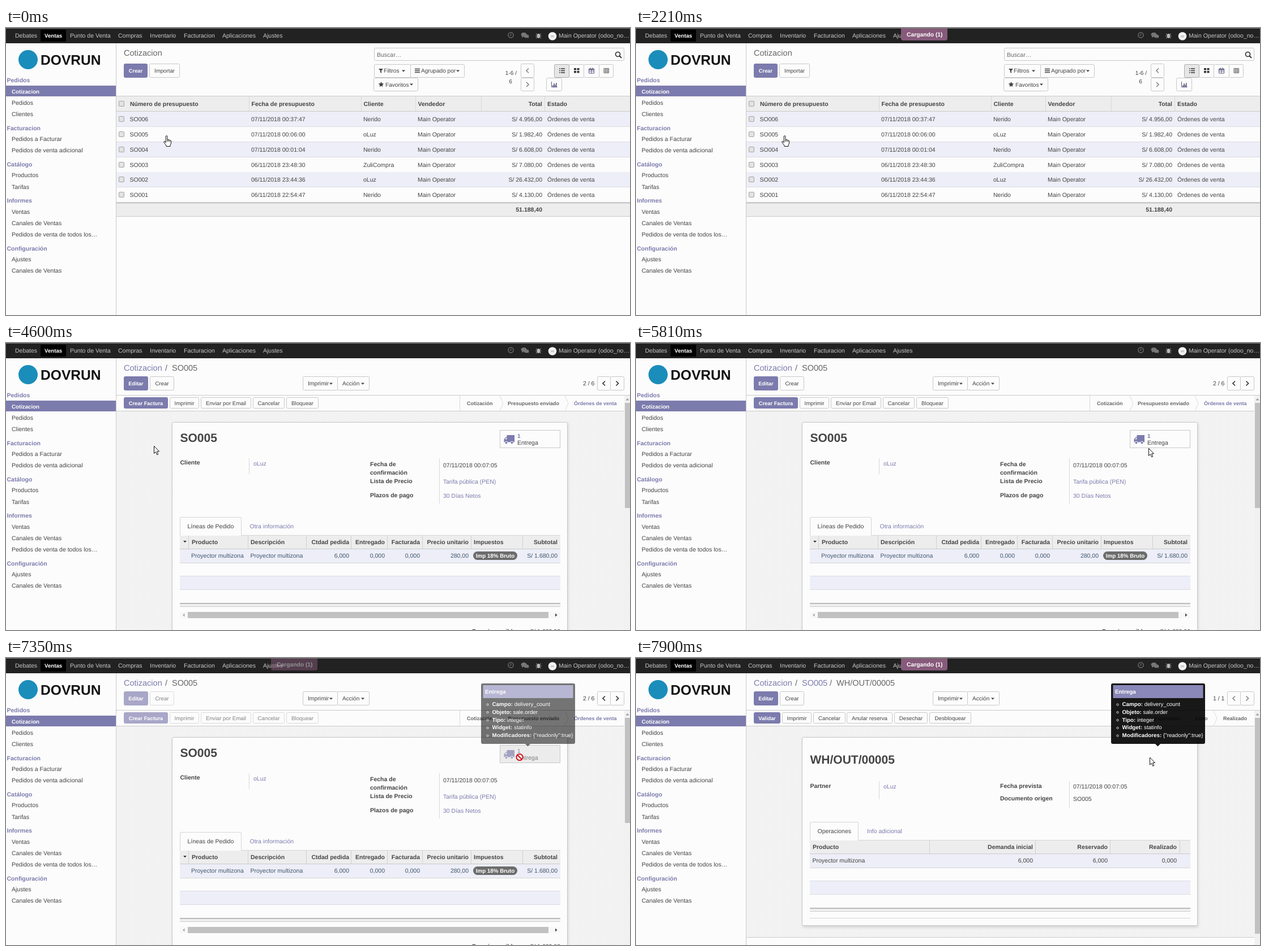
An HTML page for the animation above (8000 ms loop, 1102 by 508 pixels).

```html
<!DOCTYPE html>
<html lang="es">
<head>
<meta charset="utf-8">
<title>Cotizacion</title>
<style>
  html, body { margin: 0; width: 100%; height: 100%; overflow: hidden; background: #fcfcfc; }
  svg { display: block; width: 1102px; height: 508px; }
  text { font-family: "Liberation Sans", Arial, sans-serif; text-rendering: geometricPrecision; white-space: pre; }
</style>
</head>
<body>
<svg id="stage" viewBox="0 0 1102 508"></svg>
<script>
const PURPLE = '#7c7bad', INK = '#444', PAPER = '#fcfcfc', LINE = '#cacaca', STRIPE = '#edeef7', HEAD = '#ededed';
const CLIENTS = ['Nerido', 'oLuz', 'ZuliCompra'];
const USER = 'Main Operator', PRODUCT = 'Proyector multizona', TAX = 'Imp 18% Bruto';

// SVG helpers
const text = (x, y, label, { size = 10.5, bold, fill = INK, anchor = 'start' } = {}) =>
  `<text x="${x}" y="${y}" font-size="${size}" fill="${fill}" text-anchor="${anchor}"${bold ? ' font-weight="bold"' : ''}>${label}</text>`;
const bold = (x, y, label, options) => text(x, y, label, { bold: true, ...options });
const right = (x, y, label, options) => text(x, y, label, { anchor: 'end', ...options });
const link = (x, y, label, options) => text(x, y, label, { fill: PURPLE, ...options });
const rect = (x, y, w, h, fill, extra = '') => `<rect x="${x}" y="${y}" width="${w}" height="${h}" fill="${fill}" ${extra}/>`;
const box = (x, y, w, h, fill = PAPER, rx = 2, stroke = '#c8c8c8') =>
  rect(x + .5, y + .5, w - 1, h - 1, fill, `rx="${rx}" stroke="${stroke}"`);
const hline = (x1, x2, y, color = LINE, h = 1) => rect(x1, y, x2 - x1, h, color);
const vline = (x, y1, y2, color = '#d9d9d9') => rect(x, y1, 1, y2 - y1, color);
const path = (d, fill = 'none', stroke = 'none', width = 1) =>
  `<path d="${d}" fill="${fill}" stroke="${stroke}" stroke-width="${width}"/>`;
const circle = (x, y, r, fill, stroke = 'none', width = 1) =>
  `<circle cx="${x}" cy="${y}" r="${r}" fill="${fill}" stroke="${stroke}" stroke-width="${width}"/>`;
const group = (id, content) => `<g id="${id}">${content}</g>`;
const caret = (x, y, fill = INK) => path(`M${x - 3} ${y - 1.5}h6l-3 3.2z`, fill);
const chevron = (x, y, dir, color = INK) => path(`M${x - 2 * dir} ${y - 4}l${4 * dir} 4l${-4 * dir} 4`, 'none', color, 1.7);

function button(x, y, w, h, label = '', primary = false) {
  const style = primary ? { size: 9.3, bold: true, fill: '#fff' } : { size: 9.7 };
  return box(x, y, w, h, primary ? PURPLE : PAPER, 2, primary ? PURPLE : '#c8c8c8') +
    text(x + w / 2, y + h / 2 + 3.5, label, { ...style, anchor: 'middle' });
}
// Buttons given as [x, width, label]; the first one is highlighted.
const buttonRow = (y, h, items) => items.map(([x, w, label], i) => button(x, y, w, h, label, i === 0)).join('');

function navbar() {
  const items = [[16, 'Debates'], [113, 'Punto de Venta'], [198, 'Compras'], [254, 'Inventario'],
    [314, 'Facturacion'], [382, 'Aplicaciones'], [454, 'Ajustes']];
  const gray = '#777';
  return rect(0, 0, 1102, 27, '#222') + hline(0, 1102, 0, '#777') + rect(61, 3, 45, 21, '#000') +
    bold(68, 17, 'Ventas', { size: 9.7, fill: '#fff' }) +
    items.map(([x, label]) => text(x, 17, label, { fill: '#c8c8c8' })).join('') +
    circle(891.5, 12.5, 4.6, 'none', gray, 1.3) + path('M891.8 9.5v3.5h-2.5', 'none', gray) +
    `<ellipse cx="914.5" cy="11.5" rx="5" ry="3.5" fill="${gray}"/><ellipse cx="919" cy="14.5" rx="4.5" ry="3" fill="${gray}"/>` +
    path('M911 13v4l4-2zM920 16l3 2v-4z', gray) +
    `<ellipse cx="940.5" cy="14" rx="2.6" ry="4" fill="#bbb"/>` +
    path('M936 10l3 2M945 10l-3 2M935.5 14h10M936 18l3-2M945 18l-3-2', 'none', '#bbb') +
    circle(965, 14.5, 7.3, '#f4f4f4') + rect(962, 13, 6, 3.5, '#ccc', 'rx="1"') +
    text(976, 17, USER + ' (odoo_no…', { fill: '#c8c8c8' });
}

function sidebar() {
  const headings = [[92, 'Pedidos'], [176.5, 'Facturacion'], [241, 'Catálogo'], [305, 'Informes'], [389.5, 'Configuración']];
  const items = [[132, 'Pedidos'], [152.5, 'Clientes'], [196.5, 'Pedidos a Facturar'], [216.5, 'Pedidos de venta adicional'],
    [260.5, 'Productos'], [281, 'Tarifas'], [325, 'Ventas'], [345, 'Canales de Ventas'],
    [365.5, 'Pedidos de venta de todos los…'], [409.5, 'Ajustes'], [429.5, 'Canales de Ventas']];
  return rect(0, 27, 194, 481, PAPER) + vline(194, 27, 508, LINE) +
    circle(39, 56, 17, '#1b8dbb') + bold(61, 65, 'DOVRUN', { size: 24.6, fill: '#111' }) +
    rect(0, 102, 194, 19, PURPLE) + bold(10, 115.5, 'Cotizacion', { size: 9.7, fill: '#fff' }) +
    headings.map(([y, label]) => bold(1.5, y + 4, label, { fill: PURPLE })).join('') +
    items.map(([y, label]) => text(10, y + 3.7, label)).join('');
}

const checkbox = y => box(199, y - 5, 10, 10, '#e2e2e2', 1.5, '#a5a5a5');
const crumb = (x, label, isLink = true) => text(x, 49.2, label, { size: 14.5, fill: isLink ? PURPLE : '#666' });

function listPage() {
  const orders = [['07/11/2018 00:37:47', 0, '4.956,00'], ['07/11/2018 00:06:00', 1, '1.982,40'],
    ['07/11/2018 00:01:04', 0, '6.608,00'], ['06/11/2018 23:48:30', 2, '7.080,00'],
    ['06/11/2018 23:44:36', 1, '26.432,00'], ['06/11/2018 22:54:47', 0, '4.130,00']];
  const columns = [[219, 'Número de presupuesto'], [433.5, 'Fecha de presupuesto'], [631.5, 'Cliente'], [727.5, 'Vendedor'], [956, 'Estado']];
  const rows = orders.map(([date, client, total], i) => {
    const top = 148 + Math.round(i * 26.85), y = top + 17;
    return rect(195, top, 907, 27, i % 2 ? PAPER : STRIPE) + hline(195, 1102, top + 26, '#dcdce2') + checkbox(top + 13) +
      text(218.5, y, 'SO00' + (6 - i)) + text(433, y, date) + text(631, y, CLIENTS[client]) + text(727, y, USER) +
      right(947, y, 'S/ ' + total) + text(956, y, 'Órdenes de venta');
  }).join('');
  const small = { size: 10.1 };
  return crumb(208, 'Cotizacion', false) +
    button(208, 63, 42, 25, 'Crear', true) + button(253, 63, 54, 25, 'Importar') +
    box(650, 35, 442, 23) + text(655, 50.5, 'Buscar…', { fill: '#666' }) +
    circle(1080.5, 46.5, 4, 'none', '#333', 1.7) + path('M1083.5 49.5l3.5 3.5', 'none', '#333', 2) +
    box(650, 64, 65, 24) + path('M658 72h8l-3 3.5v4.5l-2-1.5v-3z', INK) + text(667, 79, 'Filtros', small) + caret(702, 76) +
    box(714, 64, 96, 24) + path('M722 72.5h9M722 75.5h9M722 78.5h9', 'none', INK, 1.5) + text(733, 79, 'Agrupado por', small) + caret(798, 76) +
    box(649, 88, 79, 24) + path('M662.5 95l1.4 3 3.3.4-2.4 2.3.6 3.3-2.9-1.6-2.9 1.6.6-3.3-2.4-2.3 3.3-.4z', INK) +
    text(670, 103.5, 'Favoritos', small) + caret(716, 100) +
    right(902, 83, '1-6 /', small) + text(891, 98, '6', { ...small, anchor: 'middle' }) +
    box(909, 63, 24, 25) + chevron(921, 75.5, -1, '#888') + box(909, 88, 24, 24) + chevron(921, 100, 1, '#888') +
    box(994, 64, 27, 24) + path('M1003 71h4v3.5h-4zM1008.5 71h4v3.5h-4zM1003 76h4v3.5h-4zM1008.5 76h4v3.5h-4z', '#333') +
    box(968, 64, 27, 24, '#e6e6e6', 2, '#adadad') +
    path('M980 72h7M980 75.5h7M980 79h7M977 72h1.7M977 75.5h1.7M977 79h1.7', 'none', '#333', 1.6) +
    box(1020, 64, 28, 24) + path('M1029.5 72.5h9v7.5h-9zM1032 70v3M1036 70v3M1030 76h9M1034 73v7', 'none', '#55557f') + rect(1029, 72, 10, 2, '#55557f') +
    box(1047, 64, 26, 24) + path('M1056 71.5h8.5v8h-8.5zM1056 74h8M1056 77h8M1059 72v8M1062 72v8', 'none', '#666') +
    box(954, 88, 28, 24) + path('M963.5 95v9.5h10', 'none', '#55557f') + path('M966 104v-3M968 104v-6M970 104v-4M972 104v-7', 'none', '#55557f', 1.4) +
    hline(195, 1102, 120) + rect(195, 121, 907, 26, HEAD) + checkbox(134) +
    [429, 627, 723, 839, 951].map(x => vline(x, 121, 147)).join('') +
    columns.map(([x, label]) => bold(x, 137.5, label)).join('') + right(947, 137.5, 'Total', { bold: true }) +
    rows + hline(195, 1102, 147) + rect(195, 309, 907, 25, HEAD) + hline(195, 1102, 308.5, '#c4c4c4', 2) + hline(195, 1102, 333) +
    right(947, 325, '51.188,40', { bold: true });
}

// Parts shared by both form pages
const chrome = (pager, arrowColor, thumbHeight) =>
  rect(195, 121, 897, 387, 'url(#weave)') + hline(195, 1102, 92) + hline(195, 1092, 120) +
  box(524, 59, 62, 25) + text(533, 75, 'Imprimir', { size: 10.3 }) + caret(574, 72) +
  box(585, 59, 57, 25) + text(594, 75, 'Acción', { size: 10.1 }) + caret(630, 72) +
  text(1019, 75, pager) + box(1044, 59, 24, 25) + box(1067, 59, 25, 25) + chevron(1056, 71.5, -1, arrowColor) + chevron(1079.5, 71.5, 1, arrowColor) +
  rect(1092, 93, 10, 415, '#f1f1f1') + path('M1094.5 101.5l3-3.5 3 3.5z', '#999') + rect(1093, 106, 9, thumbHeight, '#c1c1c1');
const stage = (x, label, fill = '#666') => bold(x, 109.7, label, { size: 9, fill });
const stageArrow = x => path(`M${x} 93.5l6 13.5-6 13.5`, 'none', '#ddd');
const sheet = height => rect(294, 142, 699, height + 1, '#000', 'rx="2" opacity=".12" filter="url(#soft)"') + box(293, 140, 699, height, PAPER, 2);
const tab = (y, w) => hline(307, 979, y + 32, '#d5d5d5') + path(`M307.5 ${y + 33}v-31q0-1.5 1.5-1.5h${w - 4}q1.5 0 1.5 1.5v31`, PAPER, '#d5d5d5');
const gridHead = (y, separators) => rect(307, y, 672, 24, HEAD) + hline(307, 979, y + 23) + separators.map(x => vline(x, y, y + 23, '#d0d0d0')).join('');
const gridBody = y => rect(307, y, 672, 24, STRIPE) + hline(307, 979, y + 24, '#d5d5d5') + rect(307, y + 47, 672, 24, STRIPE) +
  hline(307, 979, y + 47, '#dcdce4') + hline(307, 979, y + 71, '#dcdce4') + rect(307, y + 95, 672, 6, '#f0f0f0') +
  hline(307, 979, y + 95, '#bbb', 2) + hline(307, 979, y + 101);

function orderPage() {
  const numbers = { fill: '#3f566e' };
  const truck = path('M884.5 163h13.5v12.5h-13.5zM879.5 175.5v-5l3-4h3v9z', PURPLE) + path('M881 170.5l2-2.7h1.5v2.7z', '#e8e8f0') +
    circle(883.5, 176.5, 2.4, PURPLE, PAPER) + circle(893.5, 176.5, 2.4, PURPLE, PAPER);
  const heads = [[606, 'Ctdad pedida'], [669, 'Entregado'], [731, 'Facturada'], [817, 'Precio unitario'], [974, 'Subtotal']];
  const values = ['6,000', '0,000', '0,000', '280,00', 'S/ 1.680,00'];
  return chrome('2 / 6', '#333', 186) + crumb(208, 'Cotizacion') + crumb(281, '/', false) + crumb(293, 'SO005', false) +
    group('actions', buttonRow(59, 25, [[208, 43, 'Editar'], [254, 43, 'Crear']]) +
      buttonRow(96, 20, [[208, 78, 'Crear Factura'], [289, 52, 'Imprimir'], [344, 89, 'Enviar por Email'], [436, 56, 'Cancelar'], [495, 57, 'Bloquear']])) +
    vline(801, 93, 120) + stage(814, 'Cotización') + stageArrow(872) + stage(886, 'Presupuesto enviado') + stageArrow(987) + stage(1003, 'Órdenes de venta', PURPLE) +
    sheet(400) + bold(307.5, 175, 'SO005', { size: 21 }) +
    `<rect id="statBox" x="872.5" y="154.5" width="106" height="31" stroke="#c8c8c8"/>` +
    group('stat', truck + bold(903, 167.5, '1', { size: 10, fill: PURPLE }) + text(903, 180, 'Entrega')) +
    bold(307.5, 215, 'Cliente') + vline(429, 204, 232) + link(437, 216.5, CLIENTS[1]) +
    [[218, 'Fecha de'], [233, 'confirmación'], [247.5, 'Lista de Precio'], [272.5, 'Plazos de pago']].map(([y, label]) => bold(643, y, label)).join('') +
    vline(765, 204, 284) + text(772, 219.5, '07/11/2018 00:07:05') + link(772, 249, 'Tarifa pública (PEN)') + link(772, 274, '30 Días Netos') +
    tab(308, 109) + text(320.5, 327.7, 'Líneas de Pedido') + link(430.5, 327.7, 'Otra información') +
    gridHead(341, [322, 427, 530, 609, 673, 735, 821, 912]) + caret(316, 351.5, '#333') +
    [[328, 'Producto'], [432, 'Descripción'], [826, 'Impuestos']].map(([x, label]) => bold(x, 355.5, label)).join('') +
    gridBody(365) + heads.map(([x, label], i) => right(x, 355.5, label, { bold: true }) + right(x, 380, values[i], numbers)).join('') +
    text(327, 380, PRODUCT, numbers) + text(431.5, 380, PRODUCT, numbers) +
    rect(825, 369, 78, 15, '#6c6c6c', 'rx="7.5"') + bold(864, 380, TAX, { size: 9.8, fill: '#fff', anchor: 'middle' }) +
    rect(307, 476, 672, 11, '#f8f8f8') + rect(321, 476, 637, 11, '#c1c1c1') +
    path('M315.5 478.5v6l-3.5-3z', '#aaa') + path('M970 478.5v6l3.5-3z', '#444') +
    right(904, 513.5, 'Base imponible:', { bold: true }) + right(979, 513.5, 'S/ 1.680,00');
}

function deliveryPage() {
  const columns = [[701, 'Demanda inicial', '6,000'], [833, 'Reservado', '6,000'], [955, 'Realizado', '0,000']];
  return chrome('1 / 1', '#888', 382) + crumb(208, 'Cotizacion') + crumb(281, '/', false) + crumb(293, 'SO005') + crumb(342, '/', false) + crumb(354, 'WH/OUT/00005', false) +
    buttonRow(59, 25, [[208, 43, 'Editar'], [254, 43, 'Crear']]) +
    buttonRow(96, 20, [[208, 47, 'Validar'], [258, 52, 'Imprimir'], [313, 57, 'Cancelar'], [372, 81, 'Anular reserva'], [456, 59, 'Desechar'], [518, 74, 'Desbloquear']]) +
    stage(915, 'Esperando', PURPLE) + stageArrow(972) + stage(988, 'Listo') + stageArrow(1020) + stage(1037, 'Realizado') +
    sheet(334) + bold(307.5, 187, 'WH/OUT/00005', { size: 21 }) +
    bold(307.5, 229.5, 'Partner') + vline(429, 218, 250) + link(437, 231, CLIENTS[1]) +
    bold(643, 229.5, 'Fecha prevista') + bold(643, 251.5, 'Documento origen') + vline(765, 218, 266) +
    text(772, 231, '07/11/2018 00:07:05') + text(772, 253, 'SO005') +
    tab(290, 86) + text(320.5, 310, 'Operaciones') + link(408, 310, 'Info adicional') +
    gridHead(323, [518, 705, 837, 960]) + bold(312, 337.5, 'Producto') + gridBody(347) +
    columns.map(([x, label, value]) => right(x, 337.5, label, { bold: true }) + right(x, 362, value)).join('') +
    text(311.5, 362, PRODUCT) + hline(307, 979, 460, '#d5d5d5') +
    rect(195, 494, 897, 14, PAPER) + hline(195, 1092, 494);
}

function tooltip() {
  const facts = [['Campo', 'delivery_count'], ['Objeto', 'sale.order'], ['Tipo', 'integer'], ['Widget', 'statinfo'], ['Modificadores', '{"readonly":true}']];
  return `<g opacity=".9">${rect(839, 45, 166, 107, '#000', 'rx="3"')}${path('M917 152h9l-4.5 4.5z', '#000')}</g>` +
    rect(842.5, 48, 159, 23, '#8a88b8') + bold(846, 63, 'Entrega', { size: 9.9, fill: '#fff' }) +
    facts.map(([key, value], i) => circle(850.5, 82.5 + i * 13.75, 1.7, 'none', '#fff', .8) +
      text(858.5, 85 + i * 13.75, `<tspan font-weight="bold">${key}:</tspan> ${value}`, { size: 9.8, fill: '#fff' })).join('');
}

const pointers = {
  arrow: path('M.5.5V13.5L3.5 10.7 5.7 15.8 7.8 14.9 5.7 9.9H9.5Z', '#fff', '#111'),
  hand: path('M-.8 13V2a1.3 1.3 0 0 1 2.7 0V7.5Q3.5 6.5 4 8 5.8 7.2 6.3 9 8 8.3 8.5 10V14Q8 16 7 17V19.5H0V18L-4 12.5Q-4.7 10.5-3 10.5L-.8 12.5Z', '#fff', '#111') +
    path('M1.9 8v3M4 8.5v2.5M6.3 9.5v2', 'none', '#111'),
  ban: circle(0, 0, 5.6, '#fff', '#d0121b', 2) + path('M-4-4l8 8', 'none', '#d0121b', 2),
};

document.getElementById('stage').innerHTML =
  `<defs><pattern id="weave" width="4" height="4" patternUnits="userSpaceOnUse">${rect(0, 0, 4, 4, '#f8f8f8')}
    ${[[0, 0], [1, 1], [2, 2], [3, 3], [2, 0], [0, 2]].map(([x, y]) => rect(x, y, 1, 1, '#e9e9e9')).join('')}</pattern>
    <filter id="soft" x="-5%" y="-5%" width="110%" height="110%"><feGaussianBlur stdDeviation="2.5"/></filter></defs>` +
  rect(0, 0, 1102, 508, PAPER) + group('list', listPage()) + group('order', orderPage()) + group('delivery', deliveryPage()) +
  sidebar() + navbar() +
  group('loader', path('M468 1h82v17q0 4-4 4h-74q-4 0-4-4z', '#875a7b') +
    bold(478, 14.5, 'Cargando (<tspan id="pending">1</tspan>)', { size: 10.3, fill: '#fff' })) +
  group('tooltip', tooltip()) +
  Object.entries(pointers).map(([name, shape]) => group(name, shape)).join('');

// Timelines: [start in ms, value...]; each entry holds until the next.
const PAGES = [[0, 'list'], [2360, 'order'], [7780, 'delivery']];
const LOADER = [[0, 0], [860, .95], [1130, .5], [1260, 0], [1410, .5], [1530, .85], [1930, 1], [2360, .5], [2490, .1], [2630, 0],
  [6360, .95], [6820, .8], [6940, .35], [7060, 0], [7350, .5], [7480, .95], [7780, 1]];
const PENDING = [[0, 1], [1930, 2], [2210, 1]];
const TOOLTIP = [[0, 0], [7350, .6], [7480, 1]];
const STAT_FILL = [[0, PAPER], [5970, '#e6e6e6'], [6360, '#ececec']];
const ENABLED = [[0, 1], [6360, .65]];
const POINTER = [[0, 'hand', 283, 190], [280, 'hand', 276, 190], [430, 'hand', 262, 190], [2360, 'arrow', 261, 190],
  [4600, 'arrow', 261, 182], [4720, 'arrow', 281, 162], [4990, 'arrow', 430, 155], [5110, 'arrow', 702, 215],
  [5420, 'arrow', 800, 212], [5540, 'arrow', 871, 202], [5690, 'arrow', 890, 195], [5810, 'arrow', 905, 186],
  [5970, 'hand', 907, 178], [6110, 'hand', 907, 175], [6360, 'ban', 907, 175.5], [7780, 'arrow', 907, 175.5]];

const at = (timeline, t) => timeline.findLast(([start]) => start <= t).slice(1);
const set = (id, name, value) => document.getElementById(id).setAttribute(name, value);
const show = (id, visible) => set(id, 'display', visible ? 'inline' : 'none');

function draw(now) {
  const t = now % 8000;
  const [page] = at(PAGES, t), [pointer, x, y] = at(POINTER, t);
  for (const id of ['list', 'order', 'delivery']) show(id, id === page);
  for (const id in pointers) show(id, id === pointer);
  set(pointer, 'transform', `translate(${x} ${y})`);
  set('loader', 'opacity', at(LOADER, t)[0]);
  set('tooltip', 'opacity', at(TOOLTIP, t)[0]);
  set('statBox', 'fill', at(STAT_FILL, t)[0]);
  set('stat', 'opacity', at(ENABLED, t)[0]);
  set('actions', 'opacity', at(ENABLED, t)[0]);
  document.getElementById('pending').textContent = at(PENDING, t)[0];
  requestAnimationFrame(draw);
}
draw(performance.now());
</script>
</body>
</html>
```
